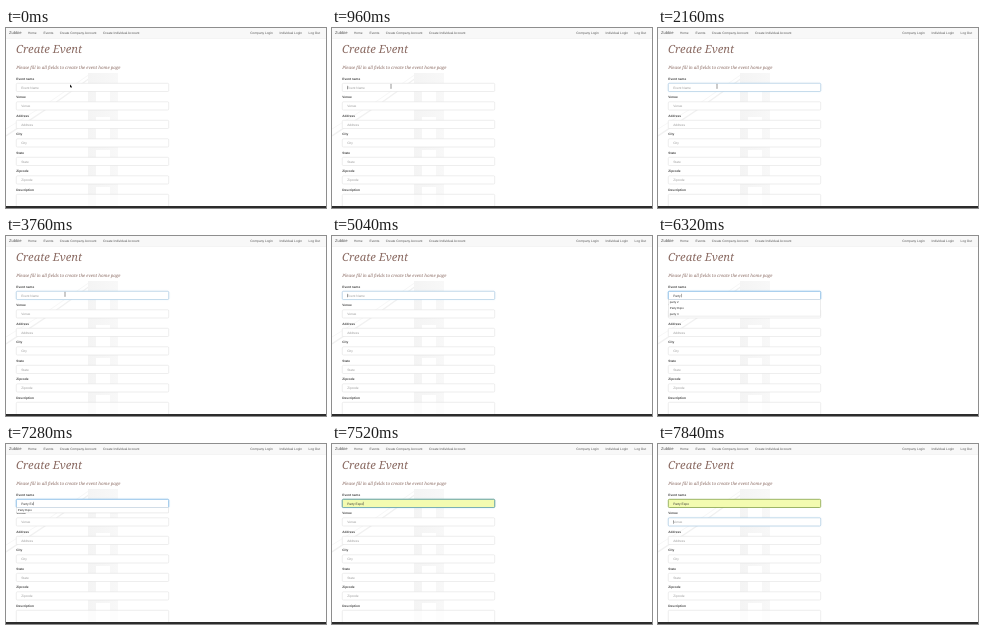
An HTML page with a canvas for the animation above (8000 ms loop, 320 px wide and 180 px high).

```html
<!DOCTYPE html>
<html lang="en">
<meta charset="utf-8">
<title>Create Event</title>
<style>
  html, body { margin: 0; height: 100%; overflow: hidden; background: #fff }
  canvas { display: block; width: 320px; height: 180px }
</style>
<canvas></canvas>
<script>
const LOOP = 8000, SANS = '"Liberation Sans", Arial, sans-serif', SERIF = '"Noto Serif", serif';
const LEFT = 10.3, WIDTH = 152.4, FIELD_TOP = 55.3, FIELD_H = 8.2, STEP = 18.5;
const canvas = document.querySelector('canvas'), c = canvas.getContext('2d');
const scale = window.devicePixelRatio || 1;
canvas.width = 320 * scale;
canvas.height = 180 * scale;

const fields = [['Event name', 'Event Name'], ['Venue', 'Venue'], ['Address', 'Address'],
  ['City', 'City'], ['State', 'State'], ['Zipcode', 'Zipcode'], ['Description', '']];
const nav = [['Home', 22], ['Events', 37.5], ['Create Company Account', 53.7],
  ['Create Individual Account', 97], ['Company Login', 244.3], ['Individual Login', 273.6], ['Log Out', 302.6]];
const typing = [[5120, 'P'], [5280, 'Pa'], [5440, 'Par'], [5680, 'Part'], [5840, 'Party'],
  [6320, 'Party '], [6640, 'Party E'], [6880, 'Party Ex'], [7360, 'Party Expo']];
const suggestions = [[5120, ['Party', 'party', 'party 2', 'Party Expo', 'party 3', 'Picnic']],
  [5280, ['Party', 'party', 'party 2', 'Party Expo', 'party 3']],
  [6320, ['party 2', 'Party Expo', 'party 3']], [6640, ['Party Expo']], [7440, []]];

const latest = (steps, t, initial) => steps.reduce((value, [at, next]) => t >= at ? next : value, initial);
const ramp = (t, from, to) => Math.min(1, Math.max(0, (t - from) / (to - from)));

function rect(x, y, w, h, color) {
  c.fillStyle = color;
  c.fillRect(x, y, w, h);
}

function text(string, x, baseline, size, color, style = '', family = SANS) {
  c.font = `${style} ${size}px ${family}`;
  c.fillStyle = color;
  c.fillText(string, x, baseline);
  return x + c.measureText(string).width;
}

function line(points, color, width) {
  c.beginPath();
  points.forEach(p => c.lineTo(...p));
  c.strokeStyle = color;
  c.lineWidth = width;
  c.stroke();
}

function bridge() {
  line([[0, 108], [42, 80], [84, 50]], '#f1f1f1', 1.5);
  line([[0, 101], [42, 75], [84, 46]], '#f7f7f7', 1);
  const tower = c.createLinearGradient(82, 0, 112, 0);
  tower.addColorStop(0, '#f4f4f4');
  tower.addColorStop(1, '#f8f8f8');
  rect(82, 45, 8, 133, tower);
  rect(104, 45, 8, 133, tower);
  for (const y of [45, 78, 111, 148]) rect(90, y, 14, 11, tower);
}

function field(i, focus, filled) {
  const [label, placeholder] = fields[i], y = FIELD_TOP + i * STEP;
  text(label, LEFT, y - 3.4, 3.2, '#444', 'bold');
  c.beginPath();
  c.roundRect(LEFT, y, WIDTH, i === 6 ? 20 : FIELD_H, 1);
  c.save();
  c.shadowColor = `rgba(102,175,233,${focus * .5})`;
  c.shadowBlur = 2 * scale;
  c.fillStyle = filled ? '#f3fbb0' : i === 6 ? 'rgba(255,255,255,.75)' : '#fff';
  c.fill();
  c.restore();
  c.lineWidth = filled ? .8 : .45;
  c.strokeStyle = filled ? '#86a34c' : '#d9d9d9';
  c.stroke();
  c.strokeStyle = `rgba(102,175,233,${focus})`;
  c.lineWidth = .6;
  c.stroke();
  return placeholder;
}

function dropdown(items) {
  if (!items.length) return;
  const h = items.length * 5.55;
  rect(LEFT, 63.4, WIDTH, h, '#fff');
  c.strokeStyle = '#c9c9c9';
  c.lineWidth = .35;
  c.strokeRect(LEFT, 63.4, WIDTH, h);
  items.forEach((item, i) => text(item, 11.7, 67.4 + i * 5.55, 2.9, '#222'));
}

function pointer(t) {
  if (t >= 4960) return;
  const x = 64 - 5 * ramp(t, 400, 800);
  if (t < 640) {
    c.beginPath();
    [[0, 0], [0, 3.1], [.7, 2.5], [1.2, 3.6], [1.7, 3.4], [1.2, 2.3], [2.1, 2.2]]
      .forEach(([dx, dy]) => c.lineTo(x + dx, 56.5 + dy));
    c.closePath();
    c.fillStyle = '#111';
    c.fill();
  } else {
    line([[x, 56.4], [x, 60.3]], '#444', .55);
    line([[x - .7, 56.3], [x + .7, 56.3]], '#666', .35);
    line([[x - .7, 60.4], [x + .7, 60.4]], '#666', .35);
  }
}

function draw(t) {
  c.setTransform(scale, 0, 0, scale, 0, 0);
  c.textRendering = 'geometricPrecision';
  rect(0, 0, 320, 180, '#fff');
  bridge();
  rect(0, 0, 320, 10, '#f8f8f8');
  rect(0, 10, 320, .4, '#e2e2e2');
  text('Zubbie', 3, 6.4, 4.1, '#555');
  nav.forEach(([label, x]) => text(label, x, 6, 3.23, '#555'));
  text('Create Event', 10, 25.1, 11.25, '#8a6a62', 'italic', SERIF);
  text('Please fill in all fields to create the event home page', 10.2, 40.8, 4.38, '#8a6a62', 'italic', SERIF);

  const typed = latest(typing, t, ''), filled = t >= 7440;
  const moved = ramp(t, 7600, 7760);
  // The focus ring is pale until typing starts.
  const focus = [t < 1200 ? 0 : t < 5120 ? .45 : 1 - moved, moved * .45];
  let caretX = 15.2;
  fields.forEach((_, i) => {
    const placeholder = field(i, focus[i] || 0, i === 0 && filled);
    const value = i === 0 ? typed : '';
    const end = text(value || placeholder, 15.2, FIELD_TOP + i * STEP + 5.3, 3.22, value ? '#333' : '#999');
    if (value && t < 7600) caretX = end;
  });

  const blinking = t >= 960 && t < 5120 && Math.floor((t - 960) / 400) % 2 === 0;
  const steady = t >= 5120 && !(t >= 6000 && t < 6160);
  if (blinking || steady) rect(caretX, FIELD_TOP + 2.5 + (t >= 7600 ? STEP : 0), .4, 3.5, '#333');
  dropdown(latest(suggestions, t, []));
  pointer(t);
  rect(0, 178, 320, 2, '#2c2c2c');
}

function tick() {
  draw(performance.now() % LOOP);
  requestAnimationFrame(tick);
}
tick();
</script>
</html>
```
